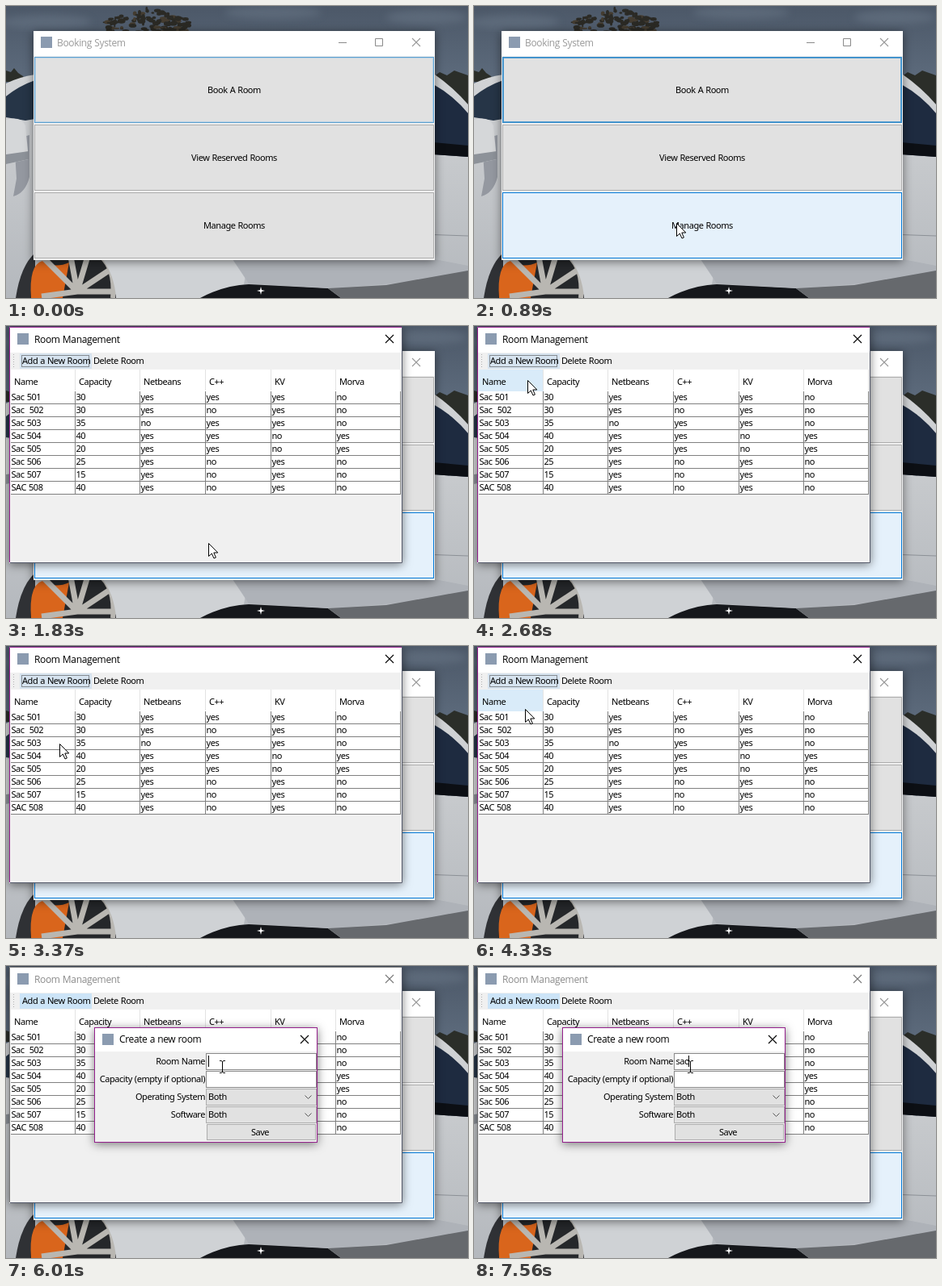
These frames come from a looping animation (571 px wide and 362 px high, 8000 ms). An HTML page:

```html
<!DOCTYPE html>
<html lang="en">
<head>
<meta charset="utf-8">
<title>Booking System</title>
<style>
  html, body { margin: 0; width: 100%; height: 100%; overflow: hidden; background: #66768a; }
  svg { display: block; width: 571px; height: 362px; }
  text { font: 11px "Noto Sans", sans-serif; letter-spacing: -.45px; word-spacing: .6px; white-space: pre; fill: #000; }
  .title { font: 12px "Open Sans", sans-serif; letter-spacing: -.35px; word-spacing: .4px; }
  .mid { text-anchor: middle; }
  .end { text-anchor: end; }
  .win { filter: drop-shadow(0 2px 6px rgba(0, 0, 0, .5)); }
</style>
</head>
<body>
<svg id="stage" viewBox="0 0 571 362" xmlns="http://www.w3.org/2000/svg">
  <defs>
    <linearGradient id="sky" x2="0" y2="1">
      <stop stop-color="#4c5868"/><stop offset="1" stop-color="#647385"/>
    </linearGradient>
    <linearGradient id="paint" x2="0" y2="1">
      <stop stop-color="#d2d4d6"/><stop offset="1" stop-color="#b4b8bd"/>
    </linearGradient>
    <filter id="soft"><feGaussianBlur stdDeviation="5"/></filter>
  </defs>
  <g id="scene">
    <rect width="571" height="130" fill="url(#sky)"/>
    <g fill="#6b7888" opacity=".5" filter="url(#soft)">
      <ellipse cx="50" cy="20" rx="55" ry="9"/><ellipse cx="330" cy="8" rx="60" ry="8"/>
      <ellipse cx="520" cy="14" rx="50" ry="9"/>
    </g>
    <g id="tree"></g>
    <path d="M0 80l6 2 4-5 5 6 6 4 4 7H0zM528 88l8-6 9 4 9-6 17 6v40h-43z" fill="#2b2e29"/>
    <path d="M0 96Q16 88 36 85H530Q553 101 571 122V362H0z" fill="url(#paint)"/>
    <path d="M0 112Q16 99 36 92V140L24 142 0 138z" fill="#263547"/>
    <path d="M528 97Q553 111 571 133V187L528 184z" fill="#1e2b40"/>
    <path d="M528 169L571 173V187L528 184z" fill="#0c0f14"/>
    <path d="M528 283.500L571 285" stroke="#8c9096"/>
    <path d="M10 165L29 160 29 212Q24 232 9 236L13 214z" fill="#9498a0"/>
    <path d="M0 141Q18 136 24 148L28 190 0 196z" fill="#d5d7d9"/>
    <path d="M0 184L28 180V190L0 196z" fill="#8d9299"/>
    <path d="M12 362Q18 322 36 306V362z" fill="#2f3135"/>
    <circle cx="88" cy="362" r="58" fill="#25272a"/>
    <path d="M31 362Q28 321 45 316Q60 326 78 318L70 362z" fill="#d9651c"/>
    <g fill="none" stroke="#b9b7b2">
      <path d="M88 354L46 312M88 354L78 300M88 354L104 300M88 354L136 322M88 354L44 360M88 354L142 354" stroke-width="7"/>
      <path d="M132 362Q136 322 112 306" stroke-width="6"/>
    </g>
    <path d="M136 362Q134 333 118 312H300L294 345 240 362z" fill="#cfd2d5"/>
    <path d="M240 362Q270 346 300 345L398 350 414 362z" fill="#15171b"/>
    <path d="M280 314H530L571 322V336L452 346 402 350 300 344z" fill="#aeb2b8"/>
    <path d="M571 328L470 346 398 350 414 362H571z" fill="#66696d"/>
    <path d="M315 348l1 4 4 1-4 1-1 4-1-4-4-1 4-1z" fill="#fff"/>
  </g>
  <g id="booking" class="win"></g>
  <g id="rooms" class="win"></g>
  <g id="dialog" class="win"></g>
  <path id="arrow" d="M.5.5V16.500L4.300 13 7 19 9.400 18 6.800 12H11.800z" fill="#fff" stroke="#000"/>
  <g id="beam" fill="none" stroke="#000"><path d="M-3-7.500H-1L.5-6.500 2-7.500H4M.5-6.500V6.500M-3 7.500H-1L.5 6.500 2 7.500H4"/></g>
</svg>
<script>
const LOOP = 8000;
const PURPLE = '#94208c';
const $ = id => document.getElementById(id);

function add(parent, tag, attrs, content) {
  const el = document.createElementNS('http://www.w3.org/2000/svg', tag);
  set(el, attrs);
  if (content !== undefined) el.textContent = content;
  parent.append(el);
  return el;
}
function set(el, attrs) {
  for (const k in attrs) el.setAttribute(k, attrs[k]);
}
const box = (p, x, y, width, height, fill, stroke = 'none') =>
  add(p, 'rect', { x, y, width, height, fill, stroke });
const label = (p, x, y, s, cls = '') => add(p, 'text', { x, y, class: cls }, s);
const line = (p, d, stroke, extra) => add(p, 'path', { d, stroke, fill: 'none', ...extra });
const cross = (p, x, y, color) =>
  line(p, `M${x - 5} ${y - 5}l10 10m0-10l-10 10`, color, { 'stroke-width': 1.1 });
const icon = (p, x, y) => box(p, x, y, 14, 14, '#8b9bb0');

// Foliage behind the car
let seed = 7;
const rnd = () => (seed = seed * 16807 % 2147483647) / 2147483647;
for (let i = 0; i < 150; i++) {
  const cx = 122 + rnd() * 104;
  const top = 2 + Math.abs(cx - 176) * .3;
  add($('tree'), 'ellipse', {
    cx, cy: top + rnd() * (34 - top), rx: 1 + rnd() * 4, ry: 1 + rnd() * 2,
    fill: i % 5 ? '#2b2a25' : '#443c30'
  });
}

// Main menu
const menu = $('booking');
box(menu, 34, 31, 496, 284, '#f0f0f0');
box(menu, 34, 31, 496, 31, '#fff');
icon(menu, 43, 38);
label(menu, 63, 50, 'Booking System', 'title').style.fill = '#999';
line(menu, 'M411 45.500h10M456.500 40.500h9v9h-9z', '#8a8a8a');
cross(menu, 507, 45, '#999');
const buttons = ['Book A Room', 'View Reserved Rooms', 'Manage Rooms'].map((s, i) => {
  const b = box(menu, 35.5, 63.5 + 84 * i, 493, 81, '#e1e1e1', '#adadad');
  label(menu, 282, 108 + 84 * i, s, 'mid');
  return b;
});
const focusRing = box(menu, 36.5, 64.5, 491, 79, 'none');

// Room table
const rooms = $('rooms');
box(rooms, 4, 1, 486, 293, '#f0f0f0');
box(rooms, 5, 2, 484, 31, '#fff');
const edge = line(rooms, 'M489 1.500H4.500V293', PURPLE);
line(rooms, 'M489.500 1V293.500H5', '#555a6b');
icon(rooms, 14, 9);
const roomsTitle = label(rooms, 35, 21, 'Room Management', 'title');
const roomsClose = cross(rooms, 474, 16, '#000');
line(rooms, 'M9.500 35V52', '#b0b0b0', { 'stroke-dasharray': '1 2' });
const addFill = box(rooms, 17, 34, 89, 19, '#d6e3ef');
const addFocus = box(rooms, 19.5, 36.5, 83, 14, 'none', '#333');
set(addFocus, { 'stroke-dasharray': '1 1' });
label(rooms, 20, 47, 'Add a New Room');
label(rooms, 108, 47, 'Delete Room');

const cols = [5, 85, 165, 246, 327, 407, 487];
const heads = ['Name', 'Capacity', 'Netbeans', 'C++', 'KV', 'Morva'].map((s, i) => {
  const h = box(rooms, cols[i] + 1, 54, cols[i + 1] - cols[i], 27, '#fff');
  line(rooms, `M${cols[i + 1] + .5} 54v26`, '#e3e3e3');
  label(rooms, cols[i] + 5, 73, s);
  return h;
});
box(rooms, 6, 81, 482, 127, '#fff');
[
  'Sac 501|30|yyyn', 'Sac  502|30|ynyn', 'Sac 503|35|nyyn', 'Sac 504|40|yyny',
  'Sac 505|20|yyny', 'Sac 506|25|ynyn', 'Sac 507|15|ynyn', 'SAC 508|40|ynyn'
].forEach((row, r) => {
  const [name, size, flags] = row.split('|');
  const cells = [name, size, ...[...flags].map(f => f === 'y' ? 'yes' : 'no')];
  cells.forEach((s, c) => label(rooms, cols[c] + 1.5, 92 + 16 * r, s));
  line(rooms, `M6 ${96.5 + 16 * r}H488`, '#808080');
});
cols.slice(1).forEach(x => line(rooms, `M${x + .5} 81V208`, '#808080'));

// New room form
const form = $('dialog');
box(form, 109.5, 76.5, 275, 142, '#f0f0f0', PURPLE);
box(form, 110, 77, 274, 29, '#fff');
icon(form, 119, 84);
label(form, 140, 95, 'Create a new room', 'title');
cross(form, 369, 91, '#000');
['Room Name', 'Capacity (empty if optional)', 'Operating System', 'Software'].forEach((s, i) => {
  const y = 108.5 + 22 * i;
  label(form, 246, y + 13.5, s, 'end');
  box(form, 247.5, y, 136, 20, i < 2 ? '#fff' : '#e1e1e1', i < 2 ? '#8a8a8a' : '#adadad');
  if (i > 1) {
    label(form, 250, y + 13.5, 'Both');
    line(form, `M369.500 ${y + 8}l4 4 4-4`, '#555');
  }
});
box(form, 248.5, 196.5, 134, 19, '#e1e1e1', '#adadad');
label(form, 314, 210, 'Save', 'mid');
const typed = label(form, 249.5, 122, '');
const caret = box(form, 250, 111, 1, 14, '#000');

// Pointer: time, x, y
const path = [
  [70, 240, 312], [510, 243, 250], [660, 243, 250], [890, 250, 269],
  [2050, 250, 269], [2520, 40, 68], [2910, 106, 66],
  [3060, 106, 66], [3370, 66, 121], [3600, 82, 165], [3930, 141, 211],
  [4020, 141, 211], [4330, 63, 78], [4560, 62, 52], [4630, 62, 52], [4870, 61, 45],
  [5250, 61, 45], [5800, 266, 124], [5860, 267, 125], [LOOP, 267, 125]
];
const TICK = 76;

const clamp = v => Math.min(1, Math.max(0, v));
const mix = (a, b, k) => `rgb(${a.map((v, i) => Math.round(v + (b[i] - v) * k))})`;
const within = (t, spans) => spans.some(([a, b]) => t >= a && t < b);
const opening = (t, start) => 1 - (1 - clamp((t - start) / 150)) ** 3;

// The pointer is redrawn in ticks, not smoothly
function pointer(t) {
  let i = 0;
  while (i < path.length - 2 && t >= path[i + 1][0]) i++;
  const [t0, x0, y0] = path[i], [t1, x1, y1] = path[i + 1];
  const k = clamp(Math.floor((t - t0) / TICK + .1) * TICK / (t1 - t0));
  return [Math.round(x0 + (x1 - x0) * k), Math.round(y0 + (y1 - y0) * k)];
}

function openWindow(el, k, cx, cy) {
  const s = .95 + .05 * k;
  el.style.display = k > 0 ? '' : 'none';
  set(el, {
    opacity: k,
    transform: k < 1 ? `translate(${cx} ${cy}) scale(${s}) translate(${-cx} ${-cy})` : ''
  });
}

function draw(t) {
  const [x, y] = pointer(t);
  const hover = t < 70 ? 0 : clamp((Math.floor((t - 70) / TICK) + 1) / 5);
  const pressed = t >= 1520 && t < 1740;
  const active = t < 1740;

  set(buttons[0], { stroke: active ? mix([92, 160, 208], [52, 140, 202], hover) : '#adadad' });
  set(focusRing, { stroke: active ? mix([186, 210, 228], [84, 156, 208], hover) : 'none' });
  set(buttons[2], pressed
    ? { fill: '#cce4f7', stroke: '#005499' }
    : { fill: mix([225, 225, 225], [229, 241, 251], hover), stroke: mix([173, 173, 173], [0, 120, 215], hover) });

  openWindow(rooms, opening(t, 1650), 247, 147);
  openWindow(form, opening(t, 5100), 247, 147);

  const behind = t >= 5100;
  set(edge, { stroke: behind ? '#777' : PURPLE });
  set(roomsClose, { stroke: behind ? '#777' : '#000' });
  roomsTitle.style.fill = behind ? '#8c8c8c' : '#000';
  const over = t >= 4710;
  set(addFill, { fill: over ? '#cce4f7' : '#d6e3ef' });
  addFocus.style.display = over ? 'none' : '';
  const inHead = t > 1830 && t < 4710 && y >= 54 && y < 81;
  heads.forEach((h, i) =>
    set(h, { fill: inHead && x > cols[i] && x <= cols[i + 1] ? '#d9ebf9' : '#fff' }));

  const word = 'sac'.slice(0, (t >= 7100) + (t >= 7180) + (t >= 7560));
  if (typed.textContent !== word) typed.textContent = word;
  caret.style.display = within(t, [[5100, 5510], [6010, 6490], [7020, LOOP]]) ? '' : 'none';
  set(caret, { x: 250 + (word ? Math.round(typed.getComputedTextLength()) : 0) });

  const inField = t > 5250 && x > 248 && y > 108;
  $('arrow').style.display = t < 70 || inField ? 'none' : '';
  $('beam').style.display = inField ? '' : 'none';
  set($(inField ? 'beam' : 'arrow'), { transform: `translate(${x} ${y})` });
}

const start = performance.now();
function frame(now) {
  draw(Math.max(0, now - start) % LOOP);
  requestAnimationFrame(frame);
}
draw(0);
requestAnimationFrame(frame);
</script>
</body>
</html>
```
